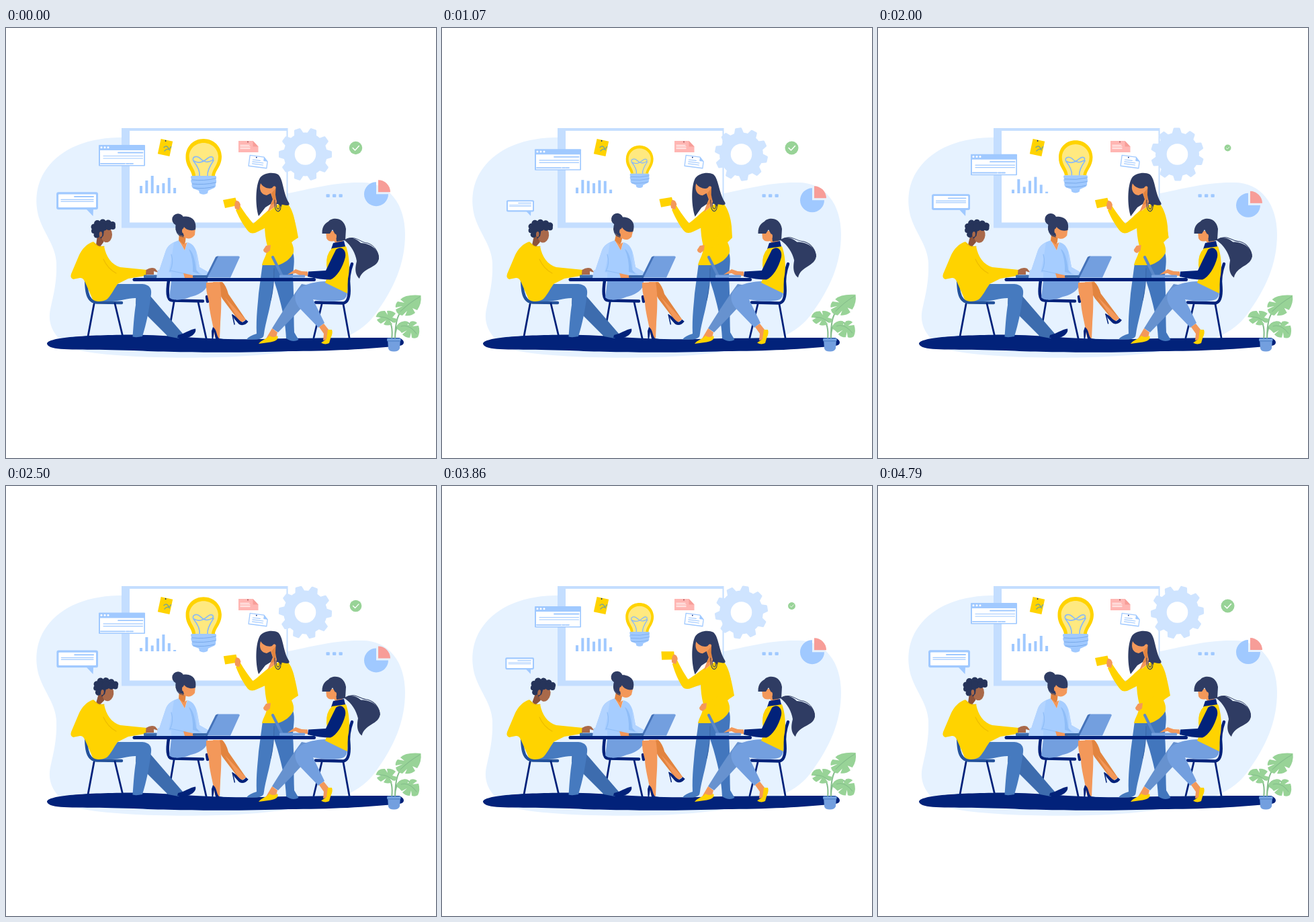
Recreate the animation shown at these times as an HTML page with a canvas. Size 640 by 640 pixels, loop 4.87 s.

```html
<!DOCTYPE html>
<html lang="en">
<head>
<meta charset="utf-8">
<title>Team meeting</title>
<style>
html, body { margin: 0; width: 100%; height: 100%; overflow: hidden; background: #fff; }
canvas { display: block; width: 640px; height: 640px; }
</style>
</head>
<body>
<canvas id="stage" width="640" height="640"></canvas>
<script>
const ctx = document.getElementById('stage').getContext('2d');
const LOOP = 4870, TAU = Math.PI * 2, TEETH = 10;
const NAVY = '#02227a', HAIR = '#2f3c63', YELLOW = '#ffd300', SKIN = '#f3985a', SHADE = '#e2843f',
  BROWN = '#a9694a', JEANS = '#467abf', DARK_JEANS = '#3d6cae', PANTS = '#739fdf', SKY = '#a0c9ff',
  SHIRT = '#a6cdff', SLEEVE = '#b3d4ff', FOLD = '#8fbdf7', PALE = '#cfe4ff', BLOB = '#e6f2ff',
  GREEN = '#98d397', STEM = '#84bd8b', PINK = '#f79d98';

const paths = new Map();
function path(d) {
  if (!paths.has(d)) paths.set(d, new Path2D(d));
  return paths.get(d);
}
function fill(color, d) {
  ctx.fillStyle = color;
  ctx.fill(path(d));
}
function line(color, width, d) {
  ctx.strokeStyle = color;
  ctx.lineWidth = width;
  ctx.stroke(path(d));
}
function oval(color, x, y, rx, ry = rx, turn = 0) {
  ctx.fillStyle = color;
  ctx.beginPath();
  ctx.ellipse(x, y, rx, ry, turn, 0, TAU);
  ctx.fill();
}
function box(color, x, y, w, h, r = 0) {
  ctx.fillStyle = color;
  ctx.beginPath();
  ctx.roundRect(x, y, w, h, r);
  ctx.fill();
}
function about(x, y, turn, scale, draw) {
  ctx.save();
  ctx.translate(x, y);
  ctx.rotate(turn);
  ctx.scale(scale, scale);
  ctx.translate(-x, -y);
  draw();
  ctx.restore();
}
function shifted(x, y, draw) {
  ctx.save();
  ctx.translate(x, y);
  draw();
  ctx.restore();
}

// Swings 0 -> 1 -> 0 over one period.
const swing = (t, period) => (1 - Math.cos(TAU * (t + 40) / period)) / 2;

const BEATS = [0, 640, 1570, 2500, 3140, 3860, 4790];
function pose(t, values) {
  let i = 0;
  while (i < BEATS.length - 2 && t > BEATS[i + 1]) i++;
  const u = Math.min(1, (t - BEATS[i]) / (BEATS[i + 1] - BEATS[i]));
  return values[i] + (values[i + 1] - values[i]) * u * u * (3 - 2 * u);
}

function checkScale(t) {
  const q = (t / (LOOP / 4) + 0.05) % 1;
  if (q < 0.47) return (1 + Math.cos(Math.PI * q / 0.47)) / 2;
  return q < 0.92 ? (1 - Math.cos(Math.PI * (q - 0.47) / 0.45)) / 2 : 1;
}

function backdrop() {
  fill(BLOB, 'M190 163C130 160 85 175 60 210C42 235 43 265 50 285C58 308 74 325 75 350C76 385 68 405 65 425C63 450 80 470 110 480C170 493 330 494 400 484C470 478 525 460 548 428C578 388 594 350 594 307C594 262 570 230 530 230C490 229 450 240 420 246C380 255 300 230 250 190C230 170 215 164 190 163Z');
  box('#c4deff', 172, 149, 247.5, 148.5);
  box('#fff', 184, 153, 233.5, 136.5);
}

function gear(turn) {
  about(445.5, 188, turn, 1, () => {
    oval(PALE, 445.5, 188, 32.5);
    for (let i = 0; i < TEETH; i++)
      about(445.5, 188, (i + 0.5) * TAU / TEETH, 1, () => fill(PALE, 'M438 158L440.500 149.500Q441 148.500 442 148.500H449Q450 148.500 450.500 149.500L453 158Z'));
  });
  oval('#fff', 445.5, 188, 15.8);
}

function browser() {
  box(SKY, 138, 174, 69, 31.5, 1);
  box('#fff', 140, 182, 65.3, 22);
  for (const x of [142, 147, 152]) oval('#fff', x, 177.7, 1.5);
  line(SKY, 1.8, 'M167 185.5H203.5M141 201.8H177M179 201.8H183M184.5 201.8H189');
  line(SKY, 1.2, 'M145 190.5H203.5M145 194H203.5');
}

function bubble() {
  fill(SKY, 'M119 269H130L129.5 280Z');
  box(SKY, 75, 244.3, 62, 26, 3);
  box('#fff', 78, 247.5, 56, 19.5, 1);
  line(SKY, 2, 'M102 251H130');
  line(SKY, 1.3, 'M82 255.4H130M82 258.2H130');
}

function bars(k) {
  const tops = [[235, 241], [227, 225], [220, 237.5], [234, 227], [231, 221], [223, 234], [238, 244]];
  tops.forEach(([from, to], i) => {
    const top = from + (to - from) * k;
    box(SKY, 199 + i * 8.35, top, 4, 246 - top);
  });
}

function bulb() {
  fill(YELLOW, 'M277 220C276 211 267 206 267.5 191C268 176 279 165 294 165C309 165 320.500 176 321 191C321 206 312 211 311 220Z');
  fill('#ffe980', 'M282 220C282 210 272.500 204 272.500 191C273 180 282 171 294 171C306 171 315.500 180 316 191C316 204 307 210 306 220Z');
  line('#8ab9f5', 1.7, 'M288 220C289 212 283 203 279 198C276 192 283 189 289 194C296 201 301 200 307 197C311 193 306 189 300 194C292 201 285 201 280 198M300 220C299 212 305 203 309 197');
  fill(SKY, 'M276 220H312Q314 222 312.500 225Q314 229 312 232Q313 236 310 238L301 242L300 246Q294 249.500 288 246L287 242L279 239Q275 236 277 232Q274 228 276 225Q274 222 276 220Z');
  line('#78a9e9', 1, 'M277 226Q295 228 312 224M277 232Q295 234 312 230M279 238Q296 240 310 236');
}

function notes() {
  about(237, 178, 0.21, 1, () => {
    box(YELLOW, 228, 166.500, 18, 23);
    line('#7ea58e', 1.5, 'M235 178Q238 174 241 177T245 175M237 183Q240 178 244 180');
    oval(NAVY, 235.500, 168, 1);
  });
  fill('#ffb6b3', 'M346 168H367.500L375.500 176.500V185H346Z');
  fill(PINK, 'M367.500 168V176.500H375.500Z');
  line('#fff', 1.2, 'M349 174.500H362M349 177H363M349 179.500H363');
  oval('#a34a50', 360, 169.500, 0.9);
  about(375, 199, 0.13, 1, () => {
    fill('#fff', 'M362 191H383L389 197V207H362Z');
    line(SKY, 1.3, 'M362 191H383L389 197V207H362Z');
    fill(SKY, 'M383 191V197H389Z');
    line(SKY, 1.2, 'M367 197H378M367 200H383M367 203H383');
    oval(NAVY, 372, 193, 0.9);
  });
}

function pie() {
  fill(SKY, 'M551 247V229A18 18 0 1 0 569 247Z');
  fill(PINK, 'M554 244V226A18 18 0 0 1 572 244Z');
}

function check() {
  oval(GREEN, 520.5, 178.5, 10);
  line('#fff', 1.5, 'M516 178.500L519.500 182L525.500 175.500');
}

function floor() {
  fill(NAVY, 'M61 470C62 460 120 457 190 456.500C250 457 300 465 380 463C450 461 540 461 585 461Q592 464 592 468Q592 472 586 473C540 478 480 481 420 481C350 484 250 483 190 480C130 478 85 480 70 476Q62 474 61 470Z');
}

function manHead() {
  fill('#8b523b', 'M134 323L137 301L148 307L145 319L139 327Z');
  oval(BROWN, 149.500, 307.500, 8.500, 11.500);
  const curls = [[131, 296, 4.5], [136, 291, 5], [144, 289.5, 5], [152, 290.5, 5], [158.500, 292.500, 4.5], [159, 296, 4],
    [131, 302, 4], [137, 299, 7], [145, 296, 6], [153, 296, 5], [135, 308, 4.5], [140, 305, 3.5]];
  for (const [x, y, r] of curls) oval('#26345a', x, y, r);
  fill('#26345a', 'M139 300H146L145 309L141 314Z');
  oval(BROWN, 141, 307, 2.3, 4);
}

function man(nod) {
  line('#24529b', 4.5, 'M115.500 359.500C121 369 118 382 121 394Q124 408 136 408.500L172 409');
  line(NAVY, 2.8, 'M131 411L122 459M162 410L173.500 458');
  fill(DARK_JEANS, 'M194 384L214 398L264 456L257 462L241 459L193 411Z');
  fill(NAVY, 'M256 457C266 455 273 449 282 447.500C284 454 276 461 263 462.500L255 461Z');
  fill(JEANS, 'M166 381L203 381C214 382 217 388 216 396C213 420 209 440 203 459Q194 461 188.500 459.500C190 440 191 420 195 402C183 401 172 407 150 407L136 407C150 400 158 391 166 381Z');
  about(142, 325, nod * 0.027, 1, manHead);
  fill(YELLOW, 'M130 318L138 325L146 325C149 341 157 352 170 356L210 360L209 368.500L182 373L166 381C160 390 155 400 150 404C143 408 133 408 129 404L118 379Q115 371 110 372L100 374Q95 372 97 366L108 340C113 328 121 321 130 318Z');
  line('#eebd00', 1.2, 'M145 344Q151 358 164 365M131 320Q136 327 146 325');
  fill(BROWN, 'M208.500 360Q216 355 222 358L227 364L220 362L220 367L208 367Z');
}

function seatedHead() {
  fill(SHADE, 'M258 300L268 306L267 318L265 325L257 317Z');
  fill(SKIN, 'M261 296Q259 310 269 313Q276 315 281 308L282 297L268 290Z');
  oval(HAIR, 256, 285, 8.8);
  fill(HAIR, 'M252.500 300C251 285 260 280 268 280.500C279 281 284 289 282 300C275 303 268 300 265 296Q262 301 265 310Q255 309 252.500 300Z');
  oval(SKIN, 264, 302, 2, 3.5);
  line(HAIR, 1, 'M253 300Q255 310 264 311');
}

function seatedWoman(tilt, kick) {
  line(NAVY, 4.5, 'M242 376C240 390 239 406 248 405.500L293 406.500M299 400L300 407');
  line(NAVY, 2.8, 'M250 408L241 461M286 408L298.500 464');
  fill(PANTS, 'M246 377H300C301 390 288 397 275 400C262 406 247 406 243 401Z');
  about(312, 382, -kick * 0.062, 1, () => {
    fill(SHADE, 'M308 378H322Q328 384 331 396L357 434L349 439L322 403Z');
    fill(SKIN, 'M326 401L357 434L349 439Z');
    fill(NAVY, 'M336 426C343 428 346 436 352 438Q356 436 357 434L360.500 437C356 443 349 444 345 439Q339 433 336 426Z');
    line(NAVY, 1.5, 'M337 427L340 441');
  });
  fill(SKIN, 'M298 379L318 378C322 398 320 425 319 440L318 462L311 460C308 440 302 420 302 407Q297 390 298 379Z');
  fill(NAVY, 'M308 445C314 449 313 458 317 462L327 463.500Q326 467 318 465.500L312 463L310 452L308 464H306.500L306 451Z');
  about(262, 317, tilt * 0.15, 1, seatedHead);
  fill(SHIRT, 'M257 316L266 331L270 319C280 321 283 330 285 339L288 356L302 364L294 373H225L227 364L238 331C241 323 248 319 257 316Z');
  fill(SLEEVE, 'M250 319Q241 323 238 331L227 364L225 373H240L246 345Z');
  fill(SLEEVE, 'M283 332L288 356L302 364L294 369L284 361Z');
  fill(SKIN, 'M257.500 316L266 331L269.500 319L264 322Z');
  line(FOLD, 1.2, 'M246 337Q250 350 244 362M244 361L268 366');
  fill(FOLD, 'M272 329Q280 333 283 360L288 366L278 363Q279 344 272 329Z');
  fill(SKIN, 'M264 365L278 368L283 372H266Z');
}

function standingHead() {
  fill(HAIR, 'M378 223C384 215 398 214 405 218C413 225 412 245 421 260Q424 266 412 263L404 262L394 262L386 267L376 280C371 265 371 235 378 223Z');
  fill(SKIN, 'M379 231C376 241 380 248 388 249L394 246L397 255L389 274L403 264L402 237Q399 233 396 238C392 240 383 238 379 231Z');
  fill(SHADE, 'M402 238L401 260L394 264L398 257L395 246Z');
  fill(HAIR, 'M402 230L412 254L410 266Q402 262 401 248Z');
  line(HAIR, 1, 'M400 256Q399 272 405 273Q411 271 408 258M402 260Q402 269 405 269.500Q408 269 407 260');
}

function raisedArm(turn) {
  about(394, 275, turn, 1, () => {
    fill(YELLOW, 'M393 269C382 278 376 285 368 291C361 283 355 275 348 264L342 271C348 285 355 296 361 303Q366 308 375 303L391 295Z');
    about(345, 262, turn * 0.5, 1, () => fill(YELLOW, 'M323 256L341.500 252.500L345 264L326 268Z'));
    fill(SKIN, 'M342 257Q347 256 349 263L347 271L341 269Q339 263 342 257Z');
  });
}

function standingWoman(tilt, reach, sway) {
  fill(JEANS, 'M382 350L407 352L398 378C396 410 388 430 384 455Q384 463 373 463.500H358Q362 458 373 455C372 430 375 410 376 395Z');
  fill('#4276bd', 'M398 353L427 334C431 345 427 360 427 372C429 400 428 430 429 453L435.500 464Q427 469 417 462C416 440 412 420 404 392L398 373Z');
  line('#3b69aa', 1.2, 'M399 358Q399 385 394 405');
  raisedArm(reach * 0.011);
  fill(YELLOW, 'M414 257C424 262 430 282 431 295L432 312L425 319Q429 327 428 334C424 344 414 350 405 353H381C383 343 389 338 389 325Q385 310 385 292L391 272L397 264L390 274L404 263Z');
  shifted(sway, 0, () => {
    fill(YELLOW, 'M421 268C429 278 432 295 435 312L425 318.500L395 331L391 323L414 311Z');
    fill(SKIN, 'M394 323L393 331L388 335Q383 334 383 330L387 324Z');
  });
  about(398, 258, -tilt * 0.03, 1, standingHead);
}

function ponytail() {
  fill(HAIR, 'M504 316C510 310 520 312 528 320C545 321 556 332 555 343C553 358 531 356 526 373C517 365 521 352 522 347C520 335 514 324 504 316Z');
  line(HAIR, 1, 'M505 315C520 307 528 320 538 320C550 324 555 335 554.500 344');
}

function deskWoman(flick) {
  line(NAVY, 4.5, 'M515 351C511 362 509 374 510.500 385Q512 408 502 409.500L461 408.500');
  line(NAVY, 2.8, 'M470 411L458 461M502 411L511 461');
  fill('#6792cf', 'M440 381Q422 405 396 447L405 453Q425 433 446 410L462 385Z');
  fill(PANTS, 'M476 377L508 393Q508 405 495 406C480 408 468 406 457 404L474 439L465 446L438 418C423 401 428 379 476 377Z');
  fill(SKIN, 'M396 447L404 453L402 461L386 464Z');
  fill(YELLOW, 'M376 470C380 464 388 463 392 458Q398 462 404 458Q407 465 394 467.500Z');
  fill(SKIN, 'M466 445L473 440L481 450L477 464L472 465L473 455Z');
  fill(YELLOW, 'M479 449L485 449Q487 454 483 462L481 469Q475 472 469 468.500L477 463Z');
  about(505, 315, -flick * 0.07, 1, ponytail);
  fill(SKIN, 'M476 302L477 313Q480 319 488 317L492 322L501 318L503 302Z');
  fill(HAIR, 'M470.500 306C470 293 478 289 480 288C484 282 503 280 506 299L505 316L492 318L491 309L486 300L482 306Z');
  oval(SKIN, 490, 310, 2, 3.5);
  fill(NAVY, 'M487 320L503 317L506 329L484 329Z');
  fill(YELLOW, 'M485 328L506 325C510 335 513 356 509 373L508 395L475 379Q480 369 477 353Q476 337 485 328Z');
  fill(NAVY, 'M491 330C499 323 507 331 505 341C501 357 492 371 483 374.500Q468 374.500 449 370L450 362.500L476 361Q483 346 491 330Z');
  fill(SKIN, 'M449 369V362.500L440 362L431 359L419 367L431 365L437 368Z');
}

function table() {
  line(NAVY, 5, 'M191 374.500H458.500');
  box('#3d6cae', 205, 367.500, 20, 4.5, 1);
  fill(SLEEVE, 'M226 360L246 364V372H224Z');
  fill(PANTS, 'M297 371L312 341Q313 339.500 316 339.500H346Q349 340 347 343L334 371.500H297Z');
  fill('#4673b9', 'M297 371.500L312 341Q313 339.500 316 339.500L300 371.500Z');
  box('#3766a8', 278, 368, 22, 3.8, 1);
  line('#5a88ca', 4, 'M397 341L411 369');
  box(PANTS, 407, 367.500, 38, 4, 1);
}

function plant(lean) {
  about(578, 464, lean, 1, () => {
    line(STEM, 2, 'M579 464C579 440 582 420 600 410M574 464Q577 440 567 432M579 460C580 441 588 432 604 442');
    fill(GREEN, 'M617.500 398Q595 396 587 404L593 409L583 407Q579 411 580 416L590 414L580 419Q582 427 590 428L597 421L594 428Q603 429 609 424L605 417L612 420Q619 410 617.500 398Z');
    fill(GREEN, 'M550.500 430Q553 420 564 421L568 427L567 421Q574 420 580 425L575 431L582 433Q582 437 578 439L571 435L575 441Q567 444 562 441L566 435L558 440Q553 437 552 434L558 431Z');
    fill(GREEN, 'M582 443Q590 434 598 437L598 443L602 437Q608 435 612 439L605 444L614 443Q617 452 613 460Q609 463 604 461L603 453L601 461Q594 461 590 456L597 450L589 454Q586 450 582 448Z');
    line(STEM, 1, 'M587 422Q600 409 616 400M556 430Q567 429 576 438M588 444Q600 440 611 455');
  });
  fill(PANTS, 'M568 463H587L586 477Q584 481.500 577.500 481.500Q570 481.500 569 477Z');
  box('#5586cb', 567, 461.500, 20.500, 5, 1.5);
  line(SKY, 1, 'M568 464H587');
}

function render(t) {
  const half = swing(t, LOOP / 2), whole = swing(t, LOOP), quarter = swing(t, LOOP / 4);
  const drop = 17 * ((1 + Math.cos(TAU * (t / LOOP - 0.39))) / 2) ** 2;

  ctx.fillStyle = '#fff';
  ctx.fillRect(0, 0, 640, 640);
  ctx.lineCap = ctx.lineJoin = 'round';

  backdrop();
  gear(t / LOOP * 6 * TAU / TEETH);
  shifted(0, 14.6 * whole, browser);
  about(137, 279.5, 0, 1 - 0.345 * half, bubble);
  bars(whole);
  about(294, 206.5, 0, 1 - 0.24 * half, bulb);
  notes();
  for (const x of [476.5, 486, 495.5]) box(SKY, x, 247.300, 5.3, 4.8, 1);
  shifted(0, drop, pie);
  about(520.5, 178.5, 0, checkScale(t), check);

  floor();
  seatedWoman(half, quarter);
  man(pose(t, [0, 3, 2, 5, 4, 7.5, 0]));
  standingWoman(half, pose(t, [0, 5, -3, 3, 1, 11, 0]), pose(t, [0, -2.5, -4, 0, 0.5, 0, 0]));
  deskWoman(pose(t, [0, 1, 1, 0.9, 0, 0, 0]));
  table();
  plant(-0.03 * half);
}

function tick(now) {
  render(now % LOOP);
  requestAnimationFrame(tick);
}
render(0);
requestAnimationFrame(tick);
</script>
</body>
</html>
```
